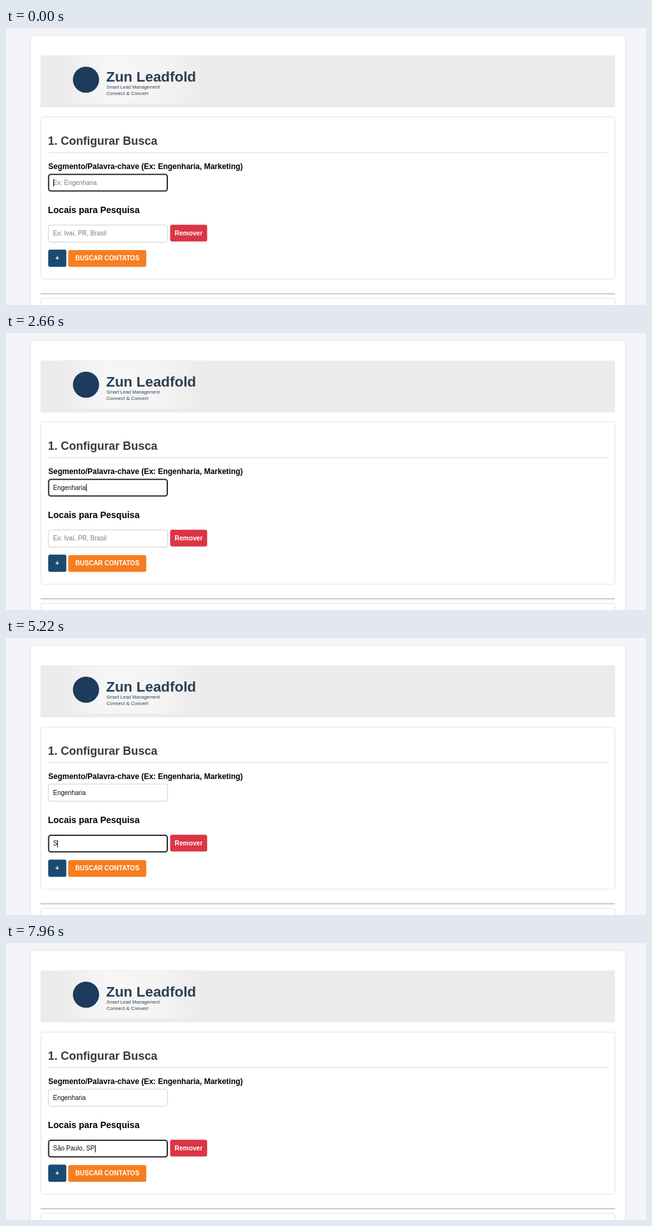
An HTML page for the animation above (8000 ms loop, 1000 px wide and 434 px high).

```html
<!DOCTYPE html>
<html lang="pt-BR">
<head>
<meta charset="utf-8">
<title>Configurar Busca</title>
<style>
  html, body { margin: 0; width: 1000px; height: 434px; overflow: hidden; background: #f4f4f9; }
  svg { display: block; }
  text { font-family: "Liberation Sans", Arial, sans-serif; white-space: pre; }
  .b { font-weight: 700; }
  .input { font-size: 10px; }
  .btn { font-weight: 700; fill: #fff; text-anchor: middle; }
  .card { fill: #fff; stroke: #e2e3e6; stroke-width: 1; }
</style>
</head>
<body>
<svg width="1000" height="434" viewBox="0 0 1000 434">
  <defs>
    <linearGradient id="glow">
      <stop offset="0" stop-color="#f6f6f6" stop-opacity="0"/>
      <stop offset=".3" stop-color="#f6f6f6"/>
      <stop offset=".65" stop-color="#f5f5f5"/>
      <stop offset="1" stop-color="#f5f5f5" stop-opacity="0"/>
    </linearGradient>
    <filter id="soft" x="-5%" y="-5%" width="110%" height="110%">
      <feGaussianBlur stdDeviation="3"/>
    </filter>
  </defs>

  <rect width="1000" height="434" fill="#f4f4f9"/>
  <rect x="39" y="13" width="928" height="450" rx="6" opacity=".06" filter="url(#soft)"/>
  <rect x="39" y="12.5" width="928" height="450" rx="6" fill="#fff"/>

  <rect x="54" y="43" width="897.5" height="81.3" fill="#ebebeb"/>
  <rect x="84" y="44" width="226" height="74.5" fill="url(#glow)"/>
  <circle cx="125" cy="81" r="20.5" fill="#1d3b5c"/>
  <text class="b" x="156.5" y="84.3" font-size="22.4" fill="#2c3e50">Zun Leadfold</text>
  <text x="157" y="95.2" font-size="7.4" fill="#3a4149">Smart Lead Management</text>
  <text x="157" y="104.7" font-size="7.75" fill="#3a4149">Connect &amp; Convert</text>

  <rect class="card" x="54.5" y="139.5" width="897" height="254" rx="4"/>
  <text class="b" x="65.5" y="182.5" font-size="18" fill="#343a40">1. Configurar Busca</text>
  <rect x="66" y="194.7" width="874" height="1" fill="#dfdfe1"/>
  <text class="b" x="66" y="221.2" font-size="12">Segmento/Palavra-chave (Ex: Engenharia, Marketing)</text>
  <text class="b" x="65.5" y="290.3" font-size="14">Locais para Pesquisa</text>

  <g id="fields"></g>

  <rect x="256.5" y="308.3" width="57.8" height="26.2" rx="3" fill="#dc3545"/>
  <text class="btn" x="285.4" y="325" font-size="10.2">Remover</text>
  <rect x="66" y="347.3" width="28.3" height="27" rx="3" fill="#1b4a70"/>
  <text class="btn" x="80.1" y="364.2" font-size="10.5">+</text>
  <rect x="97.2" y="348" width="122" height="26.2" rx="3" fill="#f67e20"/>
  <text class="btn" x="158.3" y="364.4" font-size="10">BUSCAR CONTATOS</text>

  <rect x="54" y="416" width="897.5" height="1" fill="#a0a0a0"/>
  <rect class="card" x="54.5" y="423.5" width="897" height="60" rx="4"/>

  <path id="arrow" d="M0 0V12L2.7 9.5L4.6 13.8L6.4 13L4.5 8.8H8.2Z" fill="#fff" stroke="#222" stroke-width=".8"/>
  <path id="beam" d="M-2.5 -6H2.5M0 -6V6M-2.5 6H2.5" fill="none" stroke="#222" stroke-width="1"/>
</svg>
<script>
const LOOP = 8000, BLINK = 530, FOCUS = 4340, POINTER = 3500;
const $ = id => document.getElementById(id);

function el(tag, attrs, parent) {
  const n = document.createElementNS('http://www.w3.org/2000/svg', tag);
  for (const k in attrs) n.setAttribute(k, attrs[k]);
  return parent.appendChild(n);
}

function field(y, hint, value, keys) {
  const g = $('fields');
  return {
    y, hint, value, keys,
    box: el('rect', { fill: '#fff' }, g),
    text: el('text', { class: 'input', x: 73.5, y: y + 17.2 }, g),
    caret: el('rect', { y: y + 8.2, width: 1, height: 11.5, fill: '#000' }, g)
  };
}

const topic = field(228.4, 'Ex: Engenharia', 'Engenharia',
  [1080, 1240, 1400, 1560, 1720, 1920, 2060, 2200, 2340, 2480]);
const place = field(308.2, 'Ex: Ivaí, PR, Brasil', 'São Paulo, SP',
  [5180, 5460, 5740, 5900, 6040, 6200, 6340, 6520, 6760, 7280, 7440, 7600, 7780]);

function drawField(f, t, focused, since) {
  const count = f.keys.filter(k => k <= t).length;
  const typed = f.value.slice(0, count).replace(/ $/, '\u00a0');
  const last = count ? f.keys[count - 1] : since;
  f.text.textContent = typed || f.hint;
  f.text.setAttribute('fill', typed ? '#111' : '#7c7c7c');

  const w = focused ? 1.8 : 1, pad = w / 2;
  const shape = {
    x: 65.7 + pad, y: f.y + pad, width: 187.2 - w, height: 27.8 - w,
    rx: focused ? 3.5 : 3, stroke: focused ? '#15151d' : '#cfcfcf', 'stroke-width': w
  };
  for (const k in shape) f.box.setAttribute(k, shape[k]);

  const on = focused && Math.floor((t - last) / BLINK) % 2 === 0;
  const end = typed ? f.text.getComputedTextLength() : 0;
  f.caret.setAttribute('x', Math.round(73.7 + end));
  f.caret.style.display = on ? '' : 'none';
}

const mix = (a, b, k) => a + (b - a) * Math.min(1, Math.max(0, k));

function drawPointer(t) {
  const shown = t >= POINTER && t < place.keys[0];
  const x = mix(140, 137, (t - POINTER) / 120);
  const y = t < 3620 ? mix(357, 346, (t - POINTER) / 120) : mix(346, 322, (t - 3620) / 600);
  const text = y < 336;
  for (const [id, on] of [['arrow', shown && !text], ['beam', shown && text]]) {
    $(id).style.display = on ? '' : 'none';
    $(id).setAttribute('transform', `translate(${x} ${y})`);
  }
}

function draw(t) {
  drawField(topic, t, t < FOCUS, 180 - BLINK);
  drawField(place, t, t >= FOCUS, FOCUS);
  drawPointer(t);
}

const start = performance.now();
function tick(now) {
  draw(Math.max(0, now - start) % LOOP);
  requestAnimationFrame(tick);
}
draw(0);
requestAnimationFrame(tick);
</script>
</body>
</html>
```
